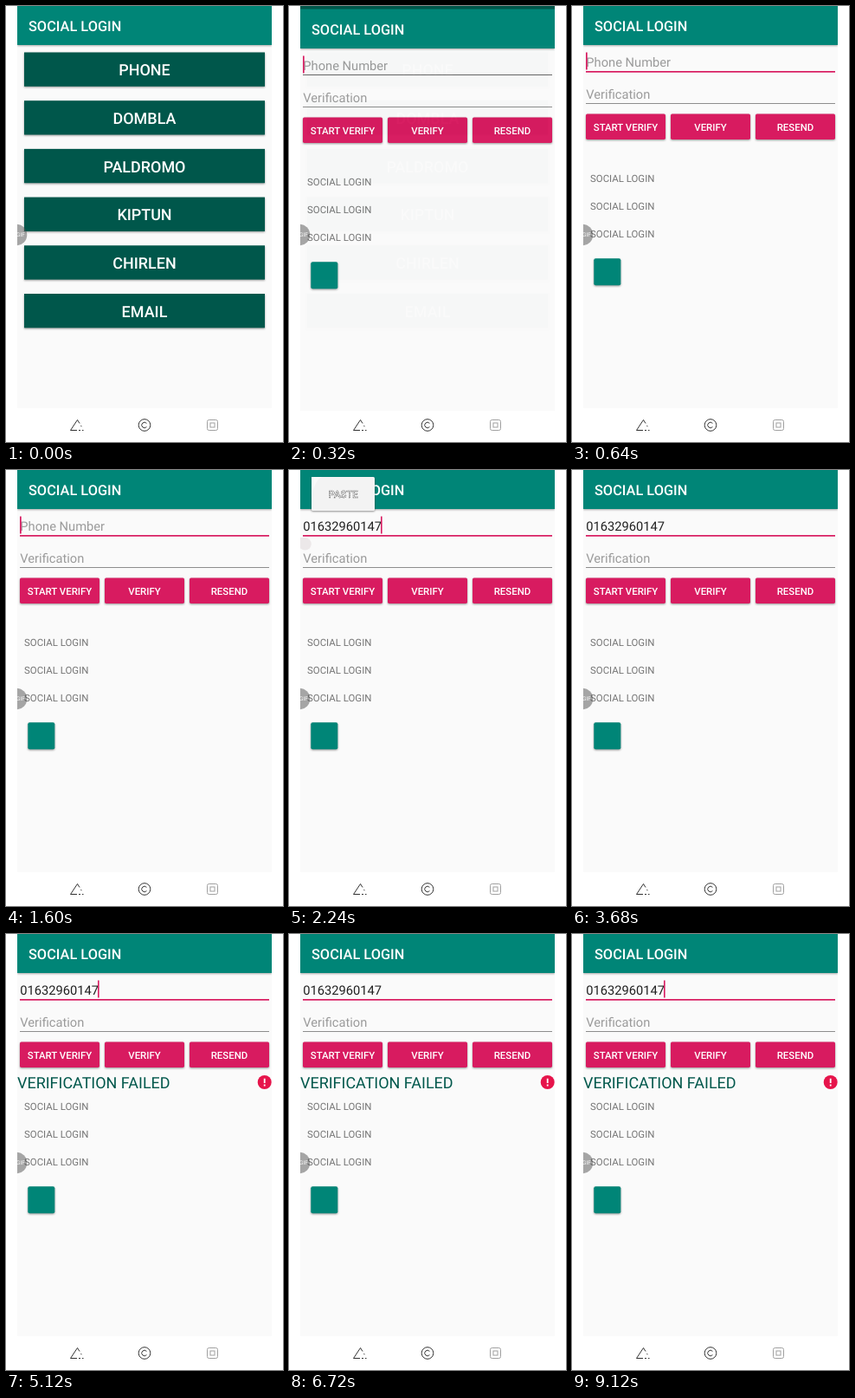
Recreate the animation shown at these times as an HTML page. Size 320 px wide and 503 px high, loop 9.6 s.

```html
<!DOCTYPE html>
<html lang="en">
<head>
<meta charset="utf-8">
<title>Social login</title>
<style>
  html, body { margin: 0; width: 100%; height: 100%; overflow: hidden; background: #fff; }
  svg { display: block; width: 100%; height: 100%; }
  text { font-family: Roboto, sans-serif; text-rendering: geometricPrecision; }
  .title { font-size: 16.33px; font-weight: 500; fill: #fff; }
  .big { font-size: 17.97px; font-weight: 500; fill: #fff; text-anchor: middle; }
  .small { font-size: 11.43px; font-weight: 500; fill: #fff; text-anchor: middle; }
  .field { font-size: 14.7px; fill: #212121; }
  .hint { fill: #9b9b9b; }
  .label { font-size: 11.43px; fill: #757575; }
  .raised { filter: drop-shadow(0 1.2px .9px #0006); }
  .bar { fill: #008577; filter: drop-shadow(0 1.5px 1.2px #0005); }

  .home, .form, .plain-line, .focus-line, .caret, .caret-end, .empty, .number,
  .popup, .paste-solid, .paste-hollow, .handle, .ripple, .error {
    animation: 9600ms step-end infinite;
  }
  .home { animation-name: home; }
  .form { animation-name: form; }
  .plain-line { animation-name: plain-line; }
  .focus-line { animation-name: focus-line; }
  .caret { animation-name: caret; }
  .caret-end { animation-name: caret-end; }
  .empty { animation-name: empty; }
  .number { animation-name: number; }
  .popup { animation-name: popup; }
  .paste-solid { animation-name: empty; }
  .paste-hollow { animation-name: number; }
  .handle { animation-name: handle; }
  .ripple { animation-name: ripple; }
  .error { animation-name: error; }

  @keyframes home { 0% { opacity: 1 } 3.333% { opacity: .015 } 5%, 100% { opacity: 0 } }
  @keyframes form {
    0% { opacity: 0; transform: translateY(4px) }
    3.333% { opacity: 1; transform: translateY(4px) }
    5% { opacity: 1; transform: translateY(1px) }
    6.666%, 100% { opacity: 1; transform: none }
  }
  @keyframes plain-line { 0% { opacity: 1 } 5%, 100% { opacity: 0 } }
  @keyframes focus-line { 0% { opacity: 0 } 5%, 100% { opacity: 1 } }
  @keyframes caret { 0%, 16.666% { opacity: 1 } 13.333%, 23.333%, 100% { opacity: 0 } }
  @keyframes caret-end {
    0%, 26.666%, 38.333%, 48.333%, 58.333%, 70%, 80%, 90% { opacity: 0 }
    23.333%, 33.333%, 43.333%, 53.333%, 63.333%, 75%, 86.666%, 95%, 100% { opacity: 1 }
  }
  @keyframes empty { 0% { opacity: 1 } 23.333%, 100% { opacity: 0 } }
  @keyframes number { 0% { opacity: 0 } 23.333%, 100% { opacity: 1 } }
  @keyframes popup { 0%, 26.666%, 100% { opacity: 0 } 18.333% { opacity: 1 } 25% { opacity: .35 } }
  @keyframes handle {
    0%, 25%, 100% { opacity: 0; fill: #d81b60 }
    18.333% { opacity: 1; fill: #d81b60 }
    23.333% { opacity: 1; fill: #ece8e9 }
  }
  @keyframes ripple {
    0%, 38.333%, 100% { opacity: 0 }
    31.666%, 36.666% { opacity: .1 }
    33.333% { opacity: .24 }
    35% { opacity: .18 }
  }
  @keyframes error { 0% { opacity: 0 } 43.333%, 100% { opacity: 1 } }
</style>
</head>
<body>
<svg viewBox="0 0 320 503">
  <clipPath id="screen"><rect x="13" width="294" height="503"/></clipPath>
  <g clip-path="url(#screen)">
    <rect x="13" width="294" height="463.5" fill="#fafafa"/>
    <rect x="13" width="294" height="5" fill="#00574b"/>

    <g class="form">
      <rect x="13" width="294" height="463.5" fill="#fafafa"/>
      <rect class="bar" x="13" y="-.5" width="294" height="45.5"/>
      <text class="title" x="26" y="28.7">SOCIAL LOGIN</text>

      <text class="field hint empty" x="16.3" y="69.6">Phone Number</text>
      <text class="field number" x="16.3" y="69.6">01632960147</text>
      <rect class="plain-line" x="16" y="75" width="288" height="1" fill="#666"/>
      <rect class="focus-line" x="16" y="75" width="288" height="1.7" fill="#d81b60"/>
      <rect class="caret" x="16" y="53.5" width="1.7" height="20" fill="#d81b60"/>
      <rect class="caret-end" x="106" y="53.5" width="1.6" height="20" fill="#d81b60"/>

      <text class="field hint" x="16.3" y="106.6">Verification</text>
      <rect x="16" y="112" width="288" height=".9" fill="#808080"/>

      <g id="actions"></g>
      <rect class="ripple" x="16" y="124.5" width="92" height="29.5" rx="1.7" fill="#fff"/>

      <g class="error">
        <text x="13" y="178.2" font-size="17.97" fill="#00574b">VERIFICATION FAILED</text>
        <circle cx="298.7" cy="171" r="8" fill="#e6144b"/>
        <path d="M298.7 166.7v5.2m0 1.7v1.8" stroke="#fff" stroke-width="1.8"/>
      </g>

      <g id="labels"></g>
      <rect class="raised" x="25.3" y="291.2" width="31" height="31" rx="2" fill="#008577"/>

      <path class="handle" d="M17 78h1.5a7.3 7.3 0 1 1-7.3 7.3V78z"/>
      <g class="popup">
        <rect class="raised" x="26" y="8" width="73" height="39" rx="1.5" fill="#f3f3f3"/>
        <path d="M26 8h12q-9 4-12 25z" fill="#fafafa"/>
        <text class="small paste-solid" x="62.7" y="31.8" style="fill:#212121">PASTE</text>
        <text class="small paste-hollow" x="62.7" y="31.8" stroke="#333" stroke-width=".5" stroke-dasharray="1.5 .6">PASTE</text>
      </g>
    </g>

    <g class="home">
      <rect x="13" width="294" height="463.5" fill="#fafafa"/>
      <rect class="bar" x="13" y="-.5" width="294" height="45.5"/>
      <text class="title" x="26" y="28.7">SOCIAL LOGIN</text>
      <g id="providers"></g>
    </g>

    <circle cx="12" cy="264" r="12.3" fill="#505050" opacity=".5"/>
    <text x="17" y="266.4" font-size="6.5" fill="#fff" text-anchor="middle">GIF</text>

    <rect x="13" y="467.5" width="294" height="36" fill="#fff"/>
    <g fill="none" stroke="#333" stroke-width="1">
      <path d="M74.5 489.5l8-12 2.5 4M74.5 489.5h7.5m2 0h2m2 0h1.5M86.5 484l.8 1.2"/>
      <circle cx="160" cy="483.5" r="6.8"/>
      <path d="M162.4 481.4a3.2 3.2 0 1 0 0 4.2"/>
      <g stroke="#a0a0a0">
        <rect x="232.5" y="477.5" width="12" height="12" rx="2"/>
        <rect x="236" y="481" width="5" height="5"/>
      </g>
    </g>
  </g>
</svg>
<script>
  const fill = (id, items, draw) => {
    document.getElementById(id).innerHTML = items.map(draw).join('');
  };

  fill('providers', ['PHONE', 'DOMBLA', 'PALDROMO', 'KIPTUN', 'CHIRLEN', 'EMAIL'], (name, i) => {
    const y = 53.5 + i * 55.7;
    return `<rect class="raised" x="21" y="${y}" width="278" height="39.3" fill="#00574b"/>
      <text class="big" x="160" y="${y + 26.7}">${name}</text>`;
  });

  fill('actions', ['START VERIFY', 'VERIFY', 'RESEND'], (name, i) => {
    const x = 16 + i * 98;
    return `<rect class="raised" x="${x}" y="124.5" width="92" height="29.5" rx="1.7" fill="#d81b60"/>
      <text class="small" x="${x + 46}" y="143.7">${name}</text>`;
  });

  fill('labels', [203.2, 235.2, 267.2], y => `<text class="label" x="21" y="${y}">SOCIAL LOGIN</text>`);
</script>
</body>
</html>
```
